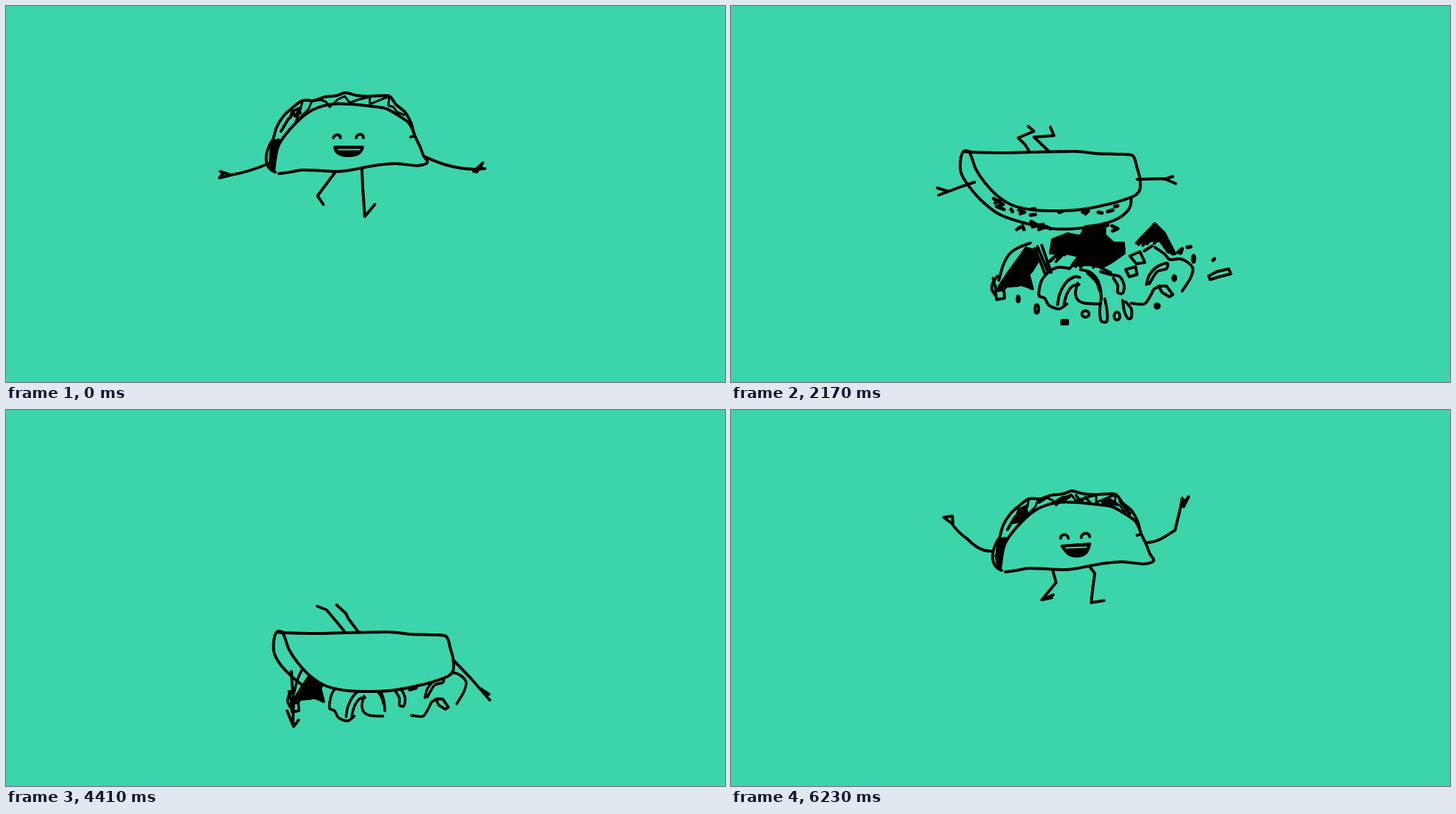
Animation, 1004 px wide and 525 px high, one loop 6.37 s. Source, as an HTML page:

```html
<!DOCTYPE html>
<html lang="en">
<head>
<meta charset="utf-8">
<title>Taco</title>
<style>
html, body { margin: 0; width: 100%; height: 100%; overflow: hidden; background: #3cd4ab; }
svg { display: block; width: 100vw; height: 100vh; fill: none; stroke: #000; stroke-width: 4; stroke-linecap: round; stroke-linejoin: round; }
.skin { fill: #3cd4ab; }
.ink { fill: #000; }
.part { display: none; }
</style>
</head>
<body>
<svg viewBox="0 0 1004 525">
  <!-- upright taco -->
  <g class="part" id="shell">
    <path class="soft" d="M381 234L396 232 414 229 440 230 465 231 482 229 497 226 520 222 545 220 574 223 587 220 588 216 583 209 578 196 570 179 566 164 557 148 545 138 537 127 530 125 505 126 490 125 474 121 462 125 445 127 430 132 414 132 400 142 388 153 378 169 373 186 369 192 364 206 364 219 369 228 376 232"/>
    <path class="soft" d="M374 230L377 208 381 194 390 180 405 163 420 150 435 142 455 137 480 137 510 140 530 143 545 151 560 161 565 167 570 180 565 183"/>
    <path d="M414 133L411 145 404 163 423 143 427 133 440 131 447 134 452 141 464 130 473 126 480 135 491 131 508 127 508 137 530 128 535 127 534 139 541 141 546 148 556 152" stroke-width="3"/>
    <path d="M397 156L400 147 411 142 404 154 411 149M384 175L394 158 402 150"/>
    <path class="ink" d="M372 189L381 187 379 197 376 208 372 230 369 216 370 203Z"/>
  </g>
  <g class="part" id="lettuce">
    <path class="ink" d="M392 165L404 158 411 151 405 163ZM448 138L461 130 471 129 459 136ZM517 137L527 133 538 140 528 139ZM368 212L376 194 374 226Z"/>
    <path d="M395 162L412 141M428 137L436 132M480 127L486 136 493 130 499 137M541 135L555 153"/>
  </g>
  <g class="part" id="face">
    <path d="M457 184C459 179 466 178 467 184M489 184C490 178 499 177 499 184"/>
    <path class="ink" d="M459 197L498 197C496 206 488 209 478 209C468 209 460 206 459 197Z"/>
    <path d="M464 200.5H494" stroke="#3cd4ab" stroke-width="1.8"/>
  </g>
  <g class="part" id="grin">
    <path d="M458 187C459 181 468 180 469 187M487 186C488 179 498 178 499 185"/>
    <path class="ink" d="M460 198L499 195C497 203 495 212 480 212C470 212 466 207 460 198Z"/>
    <path d="M466 200.5L494 199.5" stroke="#3cd4ab" stroke-width="2"/>
  </g>
  <g class="part" id="glide">
    <path d="M367 220C350 227 332 233 314 236L298 240 302 235M314 236L299 231M584 210C600 217 620 227 655 228M653 231L666 219M657 232L664 224M655 228L669 227"/>
    <path d="M459 233L435 265 443 277M497 227L498 252 501 294 515 277"/>
  </g>
  <g class="part" id="spread"><g transform="translate(35 66)">
    <path d="M328 154L300 153 273 153 257 156 272 156M257 153H273M257 147L271 147 277 151M547 150C565 147 580 145 609 146L628 147M609 145L623 138M609 146L618 142"/>
    <path d="M418 164L426 186 411 208 415 220M464 166L460 182 455 201 445 209C438 213 437 216 440 218L449 220"/>
  </g></g>
  <g class="part" id="rise">
    <path d="M367 214C340 215 318 212 302 206L288 205M302 206L290 199M584 206C610 211 635 206 652 200L667 199M652 200L662 193"/>
    <path d="M455 231L460 250 440 270 448 281M499 228L494 260 481 278 493 283"/>
  </g>
  <g class="part" id="lift">
    <path d="M367 206C342 208 318 200 300 188L286 185M300 188L291 178M583 198C610 201 636 192 655 178L666 177M655 178L661 169"/>
    <path d="M453 231L456 250 436 270 449 270M500 227L505 246 497 280 511 279"/>
  </g>
  <g class="part" id="cheer"><g transform="translate(-2 8)">
    <path d="M366 197C352 198 342 192 330 180C320 173 312 164 308 158L297 150 309 148 310 158M580 185C597 185 608 175 620 168L628 135 630 123 634 128 639 121 632 135 630 126"/>
    <path d="M449 223L454 241 434 265 450 258M434 265L448 262M501 219L508 228 505 250 503 269 521 266"/>
  </g></g>
  <g class="part" id="crouch">
    <path d="M367 215L355 237 362 252M584 212L598 236 590 251"/>
    <path d="M455 230L438 251 455 267 444 270M500 226L515 249 501 267 514 270"/>
  </g>

  <!-- diving taco -->
  <path class="part skin soft" id="back" d="M335 204L326 202 321 212 321 232 331 250 350 272 375 291 410 303 450 311 490 310 520 304 540 297 553 287 558 278 559 264"/>
  <path class="part skin soft" id="backCut" d="M335 204L326 202 321 212 321 232 331 250 350 269 372 286"/>
  <g class="part" id="full">
    <path class="skin soft" d="M388 311L379 309 374 318 374 345 390 361 410 378 418 392 440 407 465 414 490 417 520 417 580 413 605 409 614 395 616 364"/>
    <path d="M412 380L422 396 450 405 492 409M612 370L608 393 598 404 575 410"/>
  </g>
  <g class="part" id="stuffing">
    <path d="M489 394C496 393 508 402 510 412C500 412 490 403 489 394Z"/>
    <ellipse cx="528" cy="403" rx="12" ry="9"/>
    <path d="M412 372L418 384 424 374 420 393 436 381 432 397 440 387 446 397 450 389 458 398 462 389 470 398 476 391 482 397"/>
    <path d="M516 396L530 391 526 400 545 391 540 403 552 391 556 400 564 385 566 410 572 386 578 402 580 376 586 390 592 382 596 390 600 378 606 386 608 374"/>
    <path data-hatch="386 328 400 362 14 8 13"/>
    <circle cx="383" cy="328" r="5"/>
  </g>
  <g class="part" id="pile">
    <path class="ink" d="M446 345L449 326 470 318 488 322 495 308 522 305 522 320 534 331 548 331 549 345 532 357 518 365 500 361 476 362 486 349 464 344Z"/>
    <path data-hatch="440 362 500 326 15 14 -14"/>
    <path data-hatch="446 342 500 322 12 26 -14"/>
    <path data-hatch="474 364 530 360 14 20 -20"/>
    <path class="ink" d="M374 392L386 374 402 352 412 338 426 342 430 354 420 370 402 390Z"/>
    <path data-hatch="370 394 404 388 9 18 -30"/>
    <path data-hatch="398 372 418 362 8 16 -28"/>
    <path class="ink" d="M566 331L592 304 605 317 620 346 610 343 598 326 584 328Z"/>
    <path data-hatch="566 333 594 328 7 8 -10"/>
    <path data-hatch="592 304 606 326 8 10 20"/>
    <path d="M428 336L443 372M434 334L447 372M430 352L438 373M517 366L530 372"/>
    <path class="soft" d="M372 377L366 386 364 395 369 404M374 383L380 362 389 346 402 337 418 331"/>
    <path d="M369 398L371 410 382 408 381 396ZM366 380L370 396"/>
    <path class="ink" d="M398 387L408 384 416 376 421 395 412 391Z"/>
    <path class="soft" d="M471 366L456 365 443 372 433 385 430 404 438 408 444 418 458 423 469 416"/>
    <path class="soft" d="M456 417L459 402 468 386 480 378 487 379M465 416L469 402 477 391 486 389"/>
    <path class="soft" d="M484 387L481 400 484 410 494 415 514 416M488 368L502 372 512 383 516 396 517 408M498 373L510 385 515 398"/>
    <path class="soft" d="M516 371L530 375 543 378 549 390 547 401 540 400 540 390 534 380"/>
    <path d="M557 349L571 343 578 358 566 360ZM551 368L565 364 567 375 556 378Z"/>
    <path class="soft" d="M577 342L588 335M592 337L605 346 613 354 627 353 638 358 645 367 641 381 630 398"/>
    <path class="soft" d="M559 415L577 416 586 404 591 395 601 391"/>
    <path d="M597 391L608 391 617 403 612 406 602 400Z"/>
    <path class="soft" d="M580 389L584 376 595 364 609 359 608 367 595 371 584 388"/>
    <path class="soft" d="M517 408L515 425 517 440 525 440 525 425 522 409M547 411L549 425 554 436 559 435 559 423 551 413"/>
    <ellipse class="ink" cx="401" cy="409" rx="1.5" ry="4"/>
    <ellipse cx="427" cy="423" rx="2.5" ry="6"/>
    <rect class="ink" x="462" y="439" width="8" height="5"/>
    <ellipse cx="495" cy="430" rx="5" ry="4.5"/>
    <ellipse cx="539" cy="433" rx="4" ry="5.5"/>
    <ellipse class="ink" cx="595" cy="419" rx="3" ry="3"/>
    <ellipse class="ink" cx="619" cy="380" rx="2" ry="3.5"/>
    <ellipse class="ink" cx="646" cy="353" rx="1.5" ry="5"/>
    <path d="M624 344L630 339 628 345M637 337L642 336M673 355L675 353" stroke-width="5"/>
    <path id="carrot" d="M667 377L678 371 695 367 698 374 682 378 669 382Z"/>
  </g>
  <path class="part skin soft" id="front" d="M325 203L335 204 380 205 420 204 480 203 510 206 540 207 561 209 567 226 571 241 571 256 565 264 553 269 530 276 490 284 460 286 425 285 395 279 372 265 354 246 342 228 337 214 333 204"/>
  <g class="part" id="crumbs" stroke-width="5">
    <path d="M367 269L380 277 371 280 381 284M369 275L377 270M391 284L393 287M402 285L410 288 404 290M419 284L424 283M418 292L425 291M458 288L462 287M491 288L499 286 495 290M513 288L518 289M526 287L533 285M536 280L540 279"/>
    <path d="M399 312L407 307 409 312M419 301L428 306 421 308 436 305M430 312L440 308 446 311M532 307L540 311 533 314"/>
  </g>
  <path class="part" id="diveArms" d="M340 246L322 252 290 264M304 259L288 254M567 242L605 241 621 248M605 242L617 238"/>
  <path class="part" id="diveLegs" d="M417 204L411 194 401 184 423 175 415 168M444 203L423 183 451 181 446 169"/>
  <path class="part" id="digLegs" d="M381 167L394 172 405 185 419 202M408 165L421 177 425 185 438 202"/>
  <path class="part" id="digArms" d="M345 258L348 305 347 330M339 313L348 335 355 326M571 242L595 267 622 298M609 282L621 290"/>
  <path class="part" id="scoopArms" d="M337 256L300 274 322 308 335 305M322 308L331 313M569 243L611 266 594 300 581 299M594 300L585 306"/>
  <path class="part" id="pushArms" d="M337 256L315 268 331 282 367 297M353 290L356 300 349 299M353 294L364 292M569 243L601 256 583 280 571 285 569 294M575 284L582 294M580 280L577 291"/>
</svg>
<script>
const LOOP = 6370, STEP = 70;
const $ = id => document.getElementById(id);
const parts = [...document.querySelectorAll('.part')];
const move = (x, y) => `translate(${x} ${y})`;

let seed = 7;
const rnd = () => (seed = seed * 16807 % 2147483647) / 2147483647;

// round a polyline into a curve through its points
function smooth(line) {
  const n = line.match(/[\d.]+/g).map(Number), p = [];
  for (let i = 0; i < n.length; i += 2) p.push([n[i], n[i + 1]]);
  let d = `M${p[0]}`;
  for (let i = 1; i < p.length; i++) {
    const a = p[i - 1], b = p[i], a0 = p[i - 2] || a, b1 = p[i + 1] || b;
    const c1 = a.map((v, j) => v + (b[j] - a0[j]) / 7);
    const c2 = b.map((v, j) => v - (b1[j] - a[j]) / 7);
    d += `C${c1} ${c2} ${b}`;
  }
  return d;
}
for (const p of document.querySelectorAll('.soft')) {
  p.setAttribute('d', p.getAttribute('d').split('M').slice(1).map(smooth).join(''));
}

// ragged pen strokes (dx, dy) spread along a base line
for (const p of document.querySelectorAll('[data-hatch]')) {
  const [x0, y0, x1, y1, n, dx, dy] = p.dataset.hatch.split(' ').map(Number);
  let d = '';
  for (let i = 0; i < n; i++) {
    const k = i / (n - 1), r = 0.75 + rnd() * 0.3;
    const x = x0 + (x1 - x0) * k + rnd() * 5 - 2.5;
    const y = y0 + (y1 - y0) * k + rnd() * 6 - 3;
    d += `M${x} ${y}l${dx * r} ${dy * r}`;
  }
  p.setAttribute('d', d);
}

// linear keys: [time, ...values]
function at(t, keys) {
  if (t <= keys[0][0]) return keys[0].slice(1);
  for (let i = 1; i < keys.length; i++) {
    const a = keys[i - 1], b = keys[i];
    if (t <= b[0]) {
      const k = (t - a[0]) / (b[0] - a[0]);
      return a.slice(1).map((v, j) => v + (b[j + 1] - v) * k);
    }
  }
  return keys[keys.length - 1].slice(1);
}

const CYCLE = [['glide', 0, 0, 0], ['spread', 0, 5, 1.7], ['rise', 0, 2, 0.8], ['lift', 1, -3, 0], ['cheer', 2, -8, 0]];
const DIVE = [[2030, -6, -8], [2100, -2, -3], [2170, 0, 0], [2450, 2, 4], [2730, 2, 4], [2800, 1, -4], [2870, 1, -8],
  [2940, 1, -8], [3010, 9, 12], [3080, 17, 29], [3360, 17, 29], [3430, 22, 38], [3640, 35, 66], [3710, 35, 66], [4060, 53.5, 107]];
const PILE = [[1960, -30, -30, 1], [2100, -9, -9, 1], [2170, 0, 0, 1], [2310, 7, 6, 1.05], [2450, 9.5, 9, 1.08],
  [3710, 9.5, 9, 1.08], [4200, 15, 10, 1.08]];
const ROLL = [[5320, 20, 135, 150], [5390, 20, 128, 90], [5460, 22, 110, 35], [5530, 22, 95, 0]];
const JUMP = [[5740, 20, 80], [5810, 16, 10], [5880, 11, -48], [5950, 7, -88], [6020, 4, -104], [6090, 3, -85], [6160, 1, -40], [6230, 0, 0]];

function upright(out, limbs, tr, limbTr = tr) {
  out.shell = tr;
  out[limbs] = limbTr;
  if (limbs === 'cheer') out.lettuce = out.grin = tr;
  else out.face = tr;
}

function fly(out, t) {
  const [limbs, ox, oy, turn] = CYCLE[Math.floor(t / 140) % 5];
  const x = -0.0226 * t, y = -0.043 * t;
  const body = `${move(x + ox, y + oy)} rotate(${turn} 478 180)`;
  upright(out, limbs, body, limbs === 'cheer' ? body : move(x, y));
}

function heap(out, t) {
  const [x, y, s] = at(t, PILE);
  const [c] = at(t, [[4130, 1], [4830, 0.72]]);
  out.pile = `translate(505 400) scale(${c}) translate(-505 -400) ${move(x, y + 354 * (1 - s))} scale(1 ${s})`;
  const k = (s - 1) / 0.08;
  $('carrot').setAttribute('transform', move(6 * k, 9 * k));
  // loose bits go first, the lettuce last
  const bits = [...$('pile').children].reverse();
  bits.forEach((b, i) => {
    b.style.display = t >= 4200 + 630 * (i + 0.5) / bits.length ? 'none' : '';
  });
}

function dive(out, t) {
  const tr = move(...at(t, DIVE));
  out.front = tr;
  if (t < 4830) heap(out, t);
  if (t < 3430) out.back = out.crumbs = tr;
  else if (t < 4480) out.backCut = tr;
  else out.full = '';

  out[t < 3430 ? 'diveLegs' : 'digLegs'] = tr;
  if (t < 2870) out.diveArms = tr;
  else if (t >= 4900) out.pushArms = tr;
  else if (t >= 4200) out[Math.floor(t / 140) % 2 ? 'digArms' : 'scoopArms'] = tr;
  else if (t >= 3220) out.digArms = tr;

  if (t >= 4900) {
    out.stuffing = '';
    [...$('stuffing').children].forEach((b, i) => {
      b.style.display = t >= 4900 + Math.min(i, 4) * STEP ? '' : 'none';
    });
  }
}

function scene(t) {
  const out = {};
  if (t < 1890) fly(out, t);
  else if (t < 2030) {
    const late = t >= 1960;
    upright(out, 'lift', late ? 'translate(-28 25) rotate(125 478 180)' : 'translate(-34 -5) rotate(60 478 180)');
    if (late) heap(out, t);
  } else if (t < 5320) dive(out, t);
  else if (t < 5740) {
    const [x, y, a] = at(t, ROLL);
    upright(out, 'crouch', `${move(x, y)} rotate(${a} 478 180)`);
  } else {
    const [x, y] = at(t, JUMP);
    upright(out, t < 5880 ? 'lift' : 'cheer', move(x + 2, y - 8));
  }
  return out;
}

let last = -1;
function frame(now) {
  const t = Math.floor(now % LOOP / STEP) * STEP;
  if (t !== last) {
    last = t;
    const out = scene(t);
    for (const p of parts) {
      const on = p.id in out;
      p.style.display = on ? 'inline' : 'none';
      if (on) p.setAttribute('transform', out[p.id]);
    }
  }
  requestAnimationFrame(frame);
}
frame(0);
</script>
</body>
</html>
```
